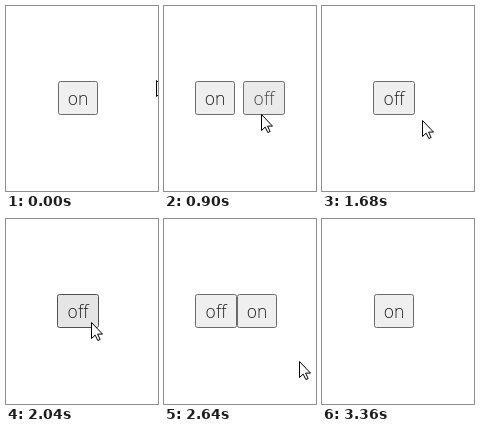
Recreate the animation shown at these times as an HTML page with a canvas. Size 152x185 px, loop 3.84 s.

```html
<!DOCTYPE html>
<html lang="en">
<head>
<meta charset="utf-8">
<title>Toggle button</title>
<style>
  html, body { margin: 0; width: 100%; height: 100%; overflow: hidden; background: #fff; }
  canvas { display: block; }
</style>
</head>
<body>
<canvas id="stage" width="152" height="185"></canvas>
<script>
const canvas = document.getElementById('stage');
const ctx = canvas.getContext('2d', { alpha: false });
const LOOP = 3840, TICK = 60, LAST_TICK = 3360;
const FADE = 500, HANDOFF = 5;
const CENTER = 72, TOP = 75, HEIGHT = 34;
const ON = { label: 'on', width: 40 };
const OFF = { label: 'off', width: 42 };

// Each toggle brings the new button in, then sends the old one out.
const toggles = [
  { start: 650, from: ON, to: OFF },
  { start: 2160, from: OFF, to: ON }
];
const toggleTime = 2 * FADE + HANDOFF;

// The pointer comes in, clicks, steps aside, returns to click, then leaves.
const entry = { x: 150, y: 74 };
const moves = [
  { start: 0, end: 540, x: 80, y: 102 },
  { start: 720, end: 1080, x: 115, y: 120 },
  { start: 1500, end: 1860, x: 85, y: 103 },
  { start: 2220, end: 2400, x: 135, y: 142 },
  { start: 3120, end: 3360, x: 154, y: 162 }
];
const arrow = new Path2D('M0 0V16L3.7 12.6L6.3 18L8.6 17L6.1 11.6H11Z');

const clamp = v => Math.min(1, Math.max(0, v));
const mix = (a, b, k) => a + (b - a) * k;
const bezier = (u, a, b) => 3 * u * (1 - u) ** 2 * a + 3 * u * u * (1 - u) * b + u ** 3;

// CSS "ease": cubic-bezier(.25, .1, .25, 1)
function ease(p) {
  let lo = 0, hi = 1;
  for (let i = 0; i < 20; i++) {
    const mid = (lo + hi) / 2;
    if (bezier(mid, 0.25, 0.25) < p) lo = mid; else hi = mid;
  }
  return bezier(lo, 0.1, 1);
}

// Every move follows a shallow arc: y lags behind x.
function pointerAt(t) {
  let { x, y } = entry;
  for (const move of moves) {
    const k = clamp((t - move.start) / (move.end - move.start));
    x = mix(x, move.x, k);
    y = mix(y, move.y, k ** 1.6);
  }
  return { x: Math.floor(x), y: Math.round(y) };
}

function drawButton({ label, width }, left, opacity, pointer) {
  const x = Math.round(left);
  const hover = pointer.x >= x && pointer.x < x + width &&
    pointer.y >= TOP && pointer.y < TOP + HEIGHT;
  ctx.globalAlpha = opacity;
  ctx.beginPath();
  ctx.roundRect(x + 0.5, TOP + 0.5, width - 1, HEIGHT - 1, 2);
  ctx.fillStyle = hover ? '#e5e5e5' : '#efefef';
  ctx.fill();
  ctx.strokeStyle = hover ? '#4f4f4f' : '#6b6b6b';
  ctx.stroke();
  ctx.fillStyle = '#222';
  ctx.font = '300 17.5px "Open Sans", "Noto Sans", sans-serif';
  ctx.textAlign = 'center';
  ctx.fillText(label, x + width / 2, TOP + 24);
  ctx.globalAlpha = 1;
}

function drawPointer({ x, y }) {
  ctx.save();
  ctx.translate(x + 0.5, y + 0.5);
  ctx.fillStyle = '#fff';
  ctx.fill(arrow);
  ctx.strokeStyle = '#000';
  ctx.stroke(arrow);
  ctx.restore();
}

function drawToggle({ start, from, to }, t, pointer) {
  const enter = ease(clamp((t - start) / FADE));
  const leave = ease(clamp((t - start - FADE - HANDOFF) / FADE));
  const left = CENTER - (from.width + to.width) / 2;
  drawButton(from, left - leave * from.width, 1 - leave, pointer);
  drawButton(to, left + from.width + (1 - enter) * to.width, enter, pointer);
}

function draw(t) {
  const pointer = pointerAt(t);
  ctx.fillStyle = '#fff';
  ctx.fillRect(0, 0, canvas.width, canvas.height);
  const active = toggles.find(({ start }) => t >= start && t < start + toggleTime);
  if (active) {
    drawToggle(active, t, pointer);
  } else {
    const button = t > toggles[0].start && t < toggles[1].start ? OFF : ON;
    drawButton(button, CENTER - button.width / 2, 1, pointer);
  }
  drawPointer(pointer);
}

const begin = performance.now();
function frame() {
  const t = (performance.now() - begin) % LOOP;
  draw(Math.min(LAST_TICK, Math.floor(t / TICK) * TICK));
  requestAnimationFrame(frame);
}
frame();
</script>
</body>
</html>
```
